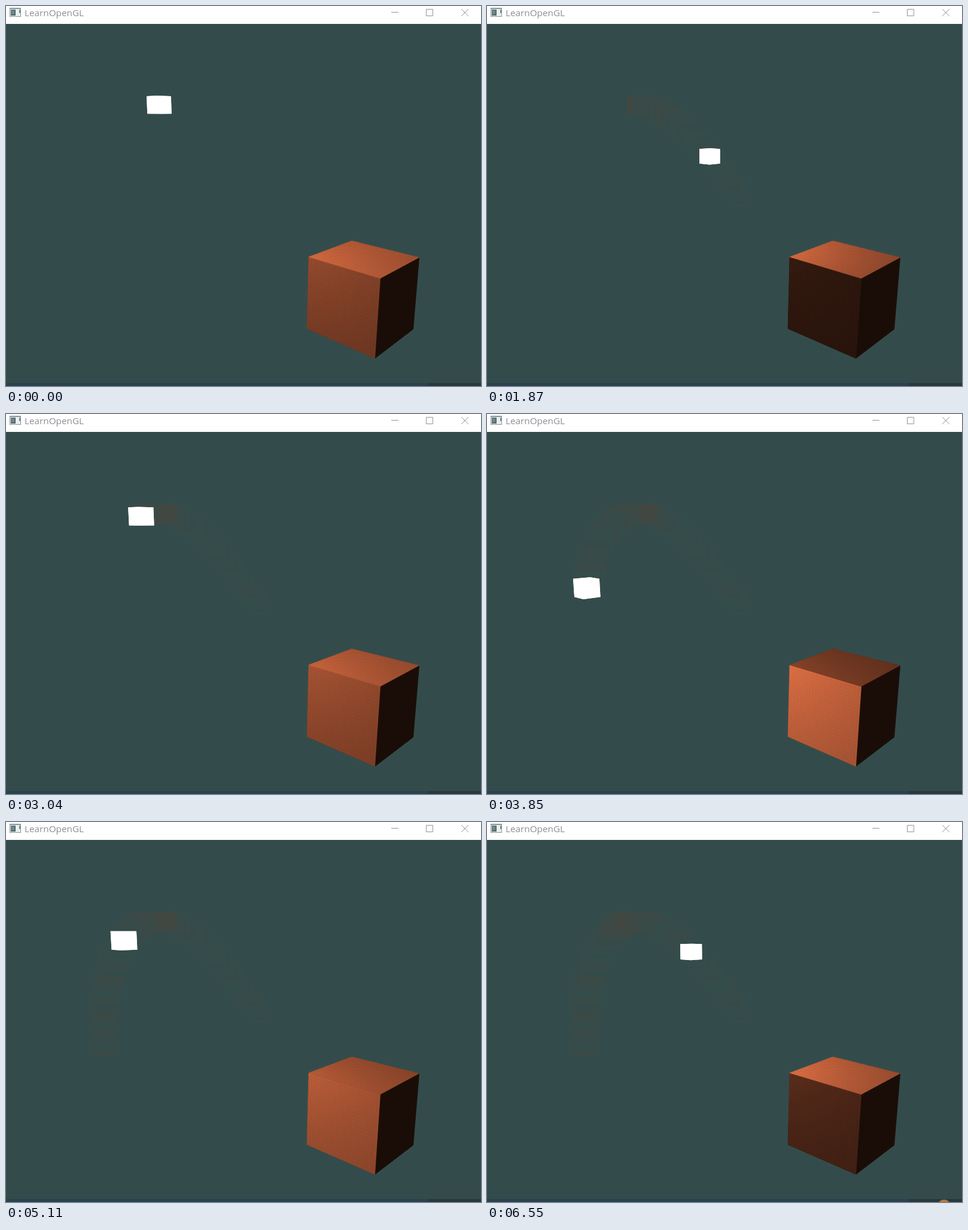
Write an HTML page with a canvas that moves like this. It is 794x636 px and loops after 6570 ms.

```html
<!DOCTYPE html>
<html lang="en">
<head>
<meta charset="utf-8">
<title>LearnOpenGL</title>
<style>
  html, body { margin: 0; width: 794px; height: 636px; overflow: hidden; }
  canvas { display: block; }
</style>
</head>
<body>
<canvas id="stage" width="794" height="636"></canvas>
<script>
const ctx = document.getElementById('stage').getContext('2d');
const LOOP = 6570;
const BG = [51, 76, 75], GHOST = [98, 62, 46];
const OBJECT = [255, 128, 79], AMBIENT = 0.1;

// Swing of the lamp: 1 = far right end, 0 = top, -1 = left end
const SWING = [[0, .02], [1395, 1], [2815, 0], [4222, -1], [5640, .01], [LOOP, .5]];

const rgb = c => `rgb(${c.map(Math.round)})`;
const mix = (a, b, k) => a.map((v, i) => v + (b[i] - v) * k);
const noise = n => { const v = Math.sin(n * 12.9898) * 43758.5453; return v - Math.floor(v); };

function swingAt(t) {
  const i = SWING.findIndex(k => k[0] > t);
  const [t0, a] = SWING[i - 1], [t1, b] = SWING[i];
  return a + (b - a) * (t - t0) / (t1 - t0);
}

function lampAt(t) {
  const s = swingAt(t);
  return [-1.62, 1.1 + 1.33 * Math.cos(s * Math.PI / 2),
    1.97 - 1.4 * s - .53 * s * s + .14 * s ** 3];
}

function project([x, y, z]) {
  const depth = 5.7 - .687 * x - .199 * y - .699 * z;
  const right = 1.54 + .713 * x - .701 * z;
  const up = -1.203 - .1397 * x + .98 * y - .142 * z;
  return [398 + 724 * right / depth, 330 - 724 * up / depth];
}

function polygon(points, fill) {
  ctx.beginPath();
  points.forEach(p => ctx.lineTo(p[0], p[1]));
  ctx.closePath();
  ctx.fillStyle = fill;
  ctx.fill();
}

const SQUARE = [[-1, -1], [1, -1], [1, 1], [-1, 1]];

function lampFaces(t) {
  const c = lampAt(t), faces = [];
  for (let axis = 0; axis < 3; axis++) for (const side of [-1, 1])
    faces.push(SQUARE.map(([a, b]) => {
      const v = [];
      v[axis] = side;
      v[(axis + 1) % 3] = a;
      v[(axis + 2) % 3] = b;
      return project(c.map((m, i) => m + v[i] * .0985));
    }));
  return faces;
}

// Each past position leaves a faint patch that later ones cover
const STEP = 31;
const patches = Array.from({ length: Math.ceil(LOOP / STEP) }, (_, n) => {
  const pts = lampFaces(n * STEP).flat();
  const xs = pts.map(p => p[0]), ys = pts.map(p => p[1]);
  const x = Math.round(Math.min(...xs)), y = Math.round(Math.min(...ys));
  const w = Math.round(Math.max(...xs)) - x, h = Math.round(Math.max(...ys)) - y;
  const nearTop = Math.exp(-(((x + w / 2 - 248) / 32) ** 2)) * (y < 170 ? 1 : 0);
  const k = .03 + .2 * noise(n + 1) ** 4 + .3 * nearTop * (.3 + .7 * noise(n + 40));
  return { x, y, w, h, color: rgb(mix(BG, GHOST, k)) };
});

function drawTrail(t) {
  for (let n = 0; n * STEP < t; n++) {
    const p = patches[n];
    ctx.fillStyle = p.color;
    ctx.fillRect(p.x, p.y, p.w, p.h);
  }
}

// Corners run back-left, front-left, front-right, back-right
const TOP = {
  screen: [[578, 393], [506, 420], [626, 456], [691, 421]],
  world: [[-.5, .5, -.5], [-.5, .5, .5], [.5, .5, .5], [.5, .5, -.5]],
  axis: 1
};
const FRONT = {
  screen: [[506, 420], [503, 540], [617, 590], [626, 456]],
  world: [[-.5, .5, .5], [-.5, -.5, .5], [.5, -.5, .5], [.5, .5, .5]],
  axis: 2
};
const SIDE = [[626, 456], [691, 421], [681, 541], [617, 590]];

const onFace = (q, u, v) => mix(mix(q[0], q[1], v), mix(q[3], q[2], v), u);

function drawLitFace({ screen, world, axis }, lamp) {
  const N = 24;
  polygon(screen, rgb(OBJECT.map(c => c * AMBIENT)));
  ctx.lineWidth = .7;
  for (let i = 0; i < N; i++) for (let j = 0; j < N; j++) {
    const at = (a, b) => onFace(screen, (i + a) / N, (j + b) / N);
    const p = onFace(world, (i + .5) / N, (j + .5) / N);
    const d = lamp.map((c, k) => c - p[k]);
    const light = AMBIENT + Math.max(0, d[axis] / Math.hypot(...d));
    const color = rgb(OBJECT.map(c => c * light * .98));
    polygon([at(0, 0), at(0, 1), at(1, 1), at(1, 0)], color);
    ctx.strokeStyle = color;
    ctx.stroke();
  }
}

function drawCube(t) {
  const [x, y, z] = lampAt(t), lamp = [x, y, z - .15];
  drawLitFace(FRONT, lamp);
  drawLitFace(TOP, lamp);
  polygon(SIDE, rgb(OBJECT.map(c => c * AMBIENT)));
}

function rect(x, y, w, h, color) {
  ctx.fillStyle = color;
  ctx.fillRect(x, y, w, h);
}

function drawWindow(t) {
  rect(0, 0, 794, 30, '#fff');
  rect(6, 3, 19, 15, '#8b9498');
  rect(7, 5, 17, 12, '#e9eef0');
  rect(8, 6, 8, 10, '#52686b');
  rect(9, 7, 5, 7, '#6f8786');
  rect(22, 6, 2, 6, '#7b8990');
  ctx.fillStyle = '#8d8d96';
  ctx.font = '15.3px "Open Sans", "Noto Sans", sans-serif';
  ctx.fillText('LearnOpenGL', 31, 17);

  ctx.strokeStyle = '#96969c';
  ctx.lineWidth = 1;
  ctx.beginPath();
  ctx.moveTo(644, 10.5); ctx.lineTo(656, 10.5);
  ctx.rect(702.5, 5.5, 11, 11);
  ctx.moveTo(761, 5); ctx.lineTo(773, 17);
  ctx.moveTo(773, 5); ctx.lineTo(761, 17);
  ctx.stroke();

  rect(0, 631, 705, 5, '#2a4250');
  rect(705, 631, 89, 5, '#29373e');
  if (t > 6450) {
    ctx.fillStyle = '#b97a35';
    ctx.beginPath();
    ctx.arc(764, 643, 11, 0, 7);
    ctx.fill();
  }
}

function frame(now) {
  const t = now % LOOP;
  rect(0, 0, 794, 636, rgb(BG));
  drawTrail(t);
  lampFaces(t).forEach(f => polygon(f, '#fff'));
  drawCube(t);
  drawWindow(t);
}

const start = performance.now();
function tick() {
  frame(performance.now() - start);
  requestAnimationFrame(tick);
}
tick();
</script>
</body>
</html>
```
